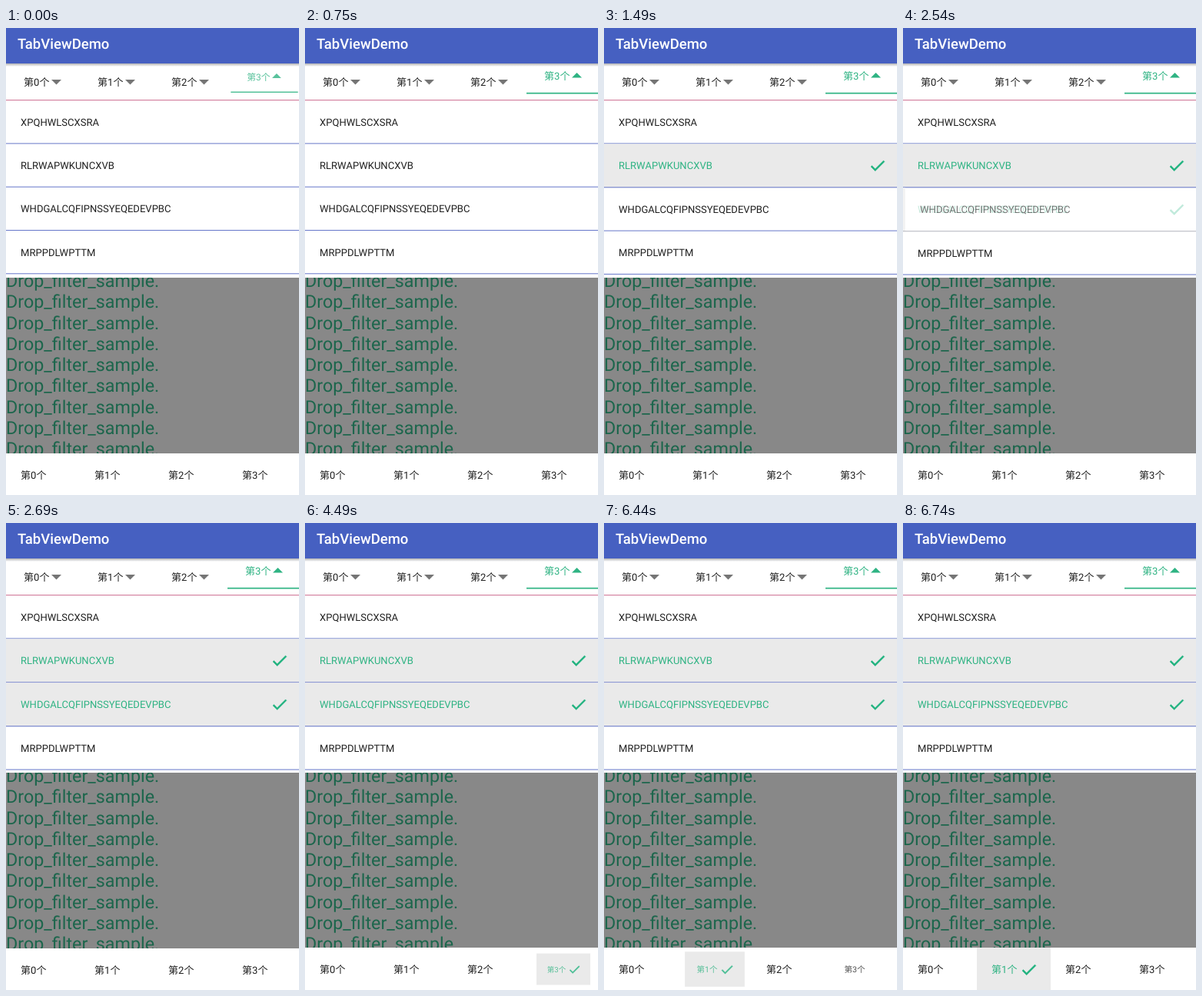
An HTML page with a canvas that plays this animation: 381 by 606 pixels, repeating every 8 s.

```html
<!DOCTYPE html>
<html lang="zh">
<head>
<meta charset="utf-8">
<title>TabViewDemo</title>
<style>
  html, body { margin: 0; height: 100%; overflow: hidden; background: #fff; }
  canvas { display: block; width: 381px; height: 606px; }
</style>
</head>
<body>
<canvas width="381" height="606"></canvas>
<script>
const LOOP = 8000, W = 381, H = 606;
const GREEN = '#2fb383', INK = '#212121', SELECTED = '#eaeaea';
const FAMILY = 'Roboto, "Noto Sans CJK SC", "Noto Sans CJK JP", "Noto Sans CJK", sans-serif';
const ITEMS = ['XPQHWLSCXSRA', 'RLRWAPWKUNCXVB', 'WHDGALCQFIPNSSYEQEDEVPBC', 'MRPPDLWPTTM'];
const TICK = new Path2D('M9 16.17L4.83 12l-1.42 1.41L9 19 21 7l-1.41-1.41z');
const c = document.querySelector('canvas').getContext('2d');
c.textRendering = 'geometricPrecision';

function rect(x, y, w, h, color) {
  c.fillStyle = color;
  c.fillRect(x, y, w, h);
}

function text(str, x, y, color, size = 13.05, weight = 400) {
  c.font = `${weight} ${size}px ${FAMILY}`;
  c.fillStyle = color;
  c.fillText(str, x, y);
}

function tick(x, midY) {
  c.save();
  c.translate(x, midY - 12.3);
  c.scale(1.02, 1.02);
  c.fillStyle = c.strokeStyle = '#1fb27e';
  c.lineWidth = .4;
  c.fill(TICK);
  c.stroke(TICK);
  c.restore();
}

function triangle(x, y, dy, color) {
  c.fillStyle = color;
  c.beginPath();
  c.moveTo(x, y);
  c.lineTo(x + 13, y);
  c.lineTo(x + 6.5, y + dy);
  c.fill();
}

function withAlpha(alpha, draw) {
  c.save();
  c.globalAlpha = alpha;
  draw();
  c.restore();
}

function scaled(x, y, s, draw) {
  c.save();
  c.translate(x, y);
  c.scale(s, s);
  c.translate(-x, -y);
  draw();
  c.restore();
}

// Value of the last [start, value] step reached at time t
const step = (t, steps) => steps.filter(s => t >= s[0]).pop()[1];

function header() {
  rect(0, 0, W, 46, '#4660c1');
  const shade = c.createLinearGradient(0, 46, 0, 50);
  shade.addColorStop(0, 'rgba(0,0,0,.3)');
  shade.addColorStop(1, 'rgba(0,0,0,0)');
  rect(0, 46, W, 4, shade);
  text('TabViewDemo', 15, 27.4, '#fff', 18.55, 500);
}

function topTabs(t) {
  for (let i = 0; i < 3; i++) {
    text(`第${i}个`, 23 + 96 * i, 75, INK);
    triangle(59 + 96 * i, 67, 6.5, '#757575');
  }
  const growing = t < 150;
  withAlpha(growing ? .8 : 1, () => scaled(336, 69, growing ? .91 : 1, () => {
    text('第3个', 311, 67.4, GREEN);
    triangle(347, 64.5, -6.5, GREEN);
    rect(288, 83.8, 96, 1.7, GREEN);
  }));
}

function row(label, top, height, state) {
  const mid = top + 29.2, base = top + 33.7;
  const chosen = () => {
    text(label, 19, base, GREEN);
    tick(343.5, mid);
  };

  if (state === 'on') {
    rect(0, top + 1, W, height, SELECTED);
    chosen();
  } else if (state === 'fade') {
    rect(0, top + 1, 3, height, '#f3f3f3');
    withAlpha(.27, chosen);
    withAlpha(.6, () => text(label, 22, base, INK));
  } else {
    text(label, state === 'shift' ? 24 : 19, base, INK);
  }
  if (state === 'fade') rect(0, top + height, W, 1, '#b4b5bd');
  if (state === 'on' || state === 'off') rect(0, top + height, W, 1, '#6677c9');
}

function list(t) {
  const states = [
    'off',
    step(t, [[0, 'off'], [1200, 'shift'], [1350, 'fade'], [1490, 'on']]),
    step(t, [[0, 'off'], [2390, 'bare'], [2540, 'fade'], [2690, 'on']]),
    'off'
  ];
  let top = 93.1;
  rect(0, top, W, 1, '#cc6f92');
  states.forEach((state, i) => {
    const height = state === 'on' || state === 'fade' ? 56.9 : 56.3;
    row(ITEMS[i], top, height, state);
    top += height;
  });
}

function backdrop() {
  c.save();
  c.beginPath();
  c.rect(0, 324, W, 228);
  c.clip();
  rect(0, 324, W, 228, '#888');
  for (let k = 0; k < 9; k++)
    text('Drop_filter_sample.', 0, 336 + 27.27 * k, '#1c664c', 23.3);
  c.restore();
}

function bottomTabs(t) {
  const top = t < 4490 ? 552 : 551;
  rect(0, top, W, H - top, '#fff');
  const active = step(t, [[0, -1], [4490, 3], [6440, 1]]);
  const press = step(t, [[0, 1], [4490, .73], [4640, .98], [4790, 1], [6440, .81], [6590, .93], [6740, 1]]);
  for (let i = 0; i < 4; i++) {
    const x = 96 * i, on = i === active;
    const s = on || (i === 3 && t >= 6440) ? press : 1;
    scaled(x + 48, 579, s, () => {
      if (on) rect(x, 551, 96, 56, SELECTED);
      withAlpha(s < .9 ? .78 : 1, () => {
        text(`第${i}个`, x + 19, top + 33.3, on ? GREEN : INK);
        if (on) tick(x + 55.5, 579.6);
      });
    });
  }
}

function frame(now) {
  const t = now % LOOP;
  rect(0, 0, W, H, '#fff');
  header();
  topTabs(t);
  list(t);
  backdrop();
  bottomTabs(t);
}

const start = performance.now();
function loop() {
  frame(performance.now() - start);
  requestAnimationFrame(loop);
}
loop();
</script>
</body>
</html>
```
